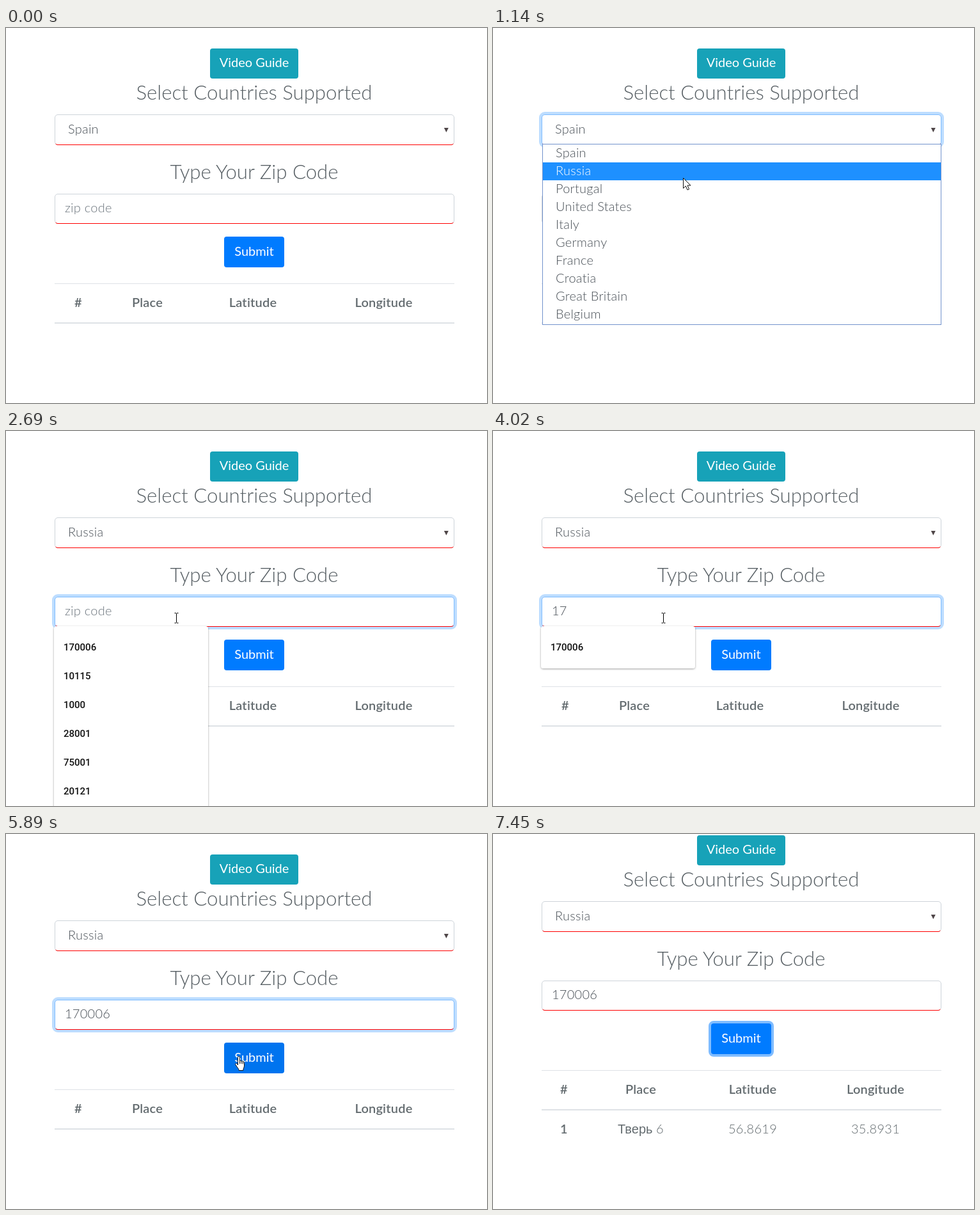
Animation, 752 px wide and 586 px high, one loop 8.09 s. Source, as an HTML page:

```html
<!DOCTYPE html>
<html lang="en">
<head>
<meta charset="utf-8">
<title>Zip code lookup</title>
<style>
  html, body { margin: 0; width: 100%; height: 100%; overflow: hidden; background: #fff; }
  svg { display: block; width: 752px; height: 586px; }
  text { font: 300 20px Lato, "Open Sans", sans-serif; letter-spacing: .25px; fill: #495057; white-space: pre; }
  .mid { text-anchor: middle; }
  .head { font-size: 31.2px; letter-spacing: 0; fill: #555d62; }
  .bold { font-weight: 600; letter-spacing: .2px; fill: #636b6f; }
  .cell { fill: #636b6f; }
  .white { fill: #fff; }
  .label { font-weight: 400; letter-spacing: 0; fill: #fff; }
  .cyr { font-family: "Liberation Sans", Arial, sans-serif; font-weight: 400; letter-spacing: 0; }
  .hint { font: 500 15px Roboto, sans-serif; letter-spacing: 0; fill: #111; }
  .red { fill: none; stroke: #f00; }
</style>
</head>
<body>
<svg id="stage" viewBox="0 0 752 586" xmlns="http://www.w3.org/2000/svg">
  <defs>
    <filter id="shade" x="-10%" y="-10%" width="120%" height="130%">
      <feDropShadow dx="0" dy="1" stdDeviation="1.6" flood-color="#000" flood-opacity=".38"/>
    </filter>
  </defs>
  <g id="page">
    <rect x="319" y="32" width="138" height="47" rx="4" fill="#17a2b8"/>
    <text class="mid label" x="388" y="61">Video Guide</text>
    <text class="mid head" x="388" y="112">Select Countries Supported</text>
    <g id="select"></g>
    <text id="country" x="97" y="165"></text>
    <path d="M684.8 156h7l-3.5 7z" fill="#4f4648"/>
    <text class="mid head" x="388" y="236">Type Your Zip Code</text>
    <g id="input"></g>
    <text id="zip" x="92" y="288"></text>
    <rect id="caret" y="269" width="1" height="27" fill="#222"/>
    <rect id="ring" x="341" y="326" width="94" height="48" rx="4" fill="none" stroke="#007bff"/>
    <rect id="button" x="341" y="326" width="94" height="48" rx="4"/>
    <text class="mid label" x="388" y="356">Submit</text>
    <path d="M76 399.5h625" stroke="#dee2e6"/>
    <path d="M76 461h625" stroke="#dee2e6" stroke-width="2"/>
    <g id="table"></g>
    <g id="hints"></g>
    <g id="menu"></g>
  </g>
  <g id="cursor" stroke-linejoin="round">
    <path id="arrow" d="M.5.5V16.5L4.3 13 7 19 9.6 17.9 7 12H12Z" fill="#fff" stroke="#111"/>
    <path id="beam" d="M.5.5H3M4 .5H6.5M3.5 1V15.5M.5 16H3M4 16H6.5" fill="none" stroke="#000"/>
    <path id="hand" d="M4.5 14V2C4.5 0 7.5 0 7.5 2V8C7.5 6.4 10 6.6 10 8.4 10.4 7.1 12.4 7.5 12.4 9.2 13 8.4 14.5 8.9 14.5 10.4V15C14.5 18 12.8 19 12.8 22.5H6.2C6 19.5 3.2 17.6 .9 13.4 0 11.6 2.3 10.6 3.3 12.2Z M7.5 8V12M10 8.4V12M12.4 9.2V12.4" fill="#fff" stroke="#111"/>
  </g>
</svg>
<script>
const LOOP = 8090;
const COUNTRIES = ["Spain", "Russia", "Portugal", "United States", "Italy",
  "Germany", "France", "Croatia", "Great Britain", "Belgium"];
const ZIPS = ["170006", "10115", "1000", "28001", "75001", "20121", "4000"];
const HEADS = ["#", "Place", "Latitude", "Longitude"];

// Cursor moves: start, end, steps, from x, y, to x, y, shape
const MOVES = [
  [70, 180, 3, 510, 402, 391, 173, "arrow"],
  [960, 1140, 3, 372, 188, 297, 234, "arrow"],
  [1760, 2000, 4, 290, 245, 265, 285, "beam"],
  [2540, 2540, 1, 263, 284, 263, 284, "beam"],
  [5730, 5810, 2, 285, 296, 318, 318, "arrow"],
  [5890, 6050, 3, 358, 347, 363, 352, "hand"],
  [6510, 6510, 1, 363, 322, 363, 322, "hand"],
  [6900, 6900, 1, 385, 328, 385, 328, "hand"],
  [6980, 7370, 6, 422, 368, 607, 567, "arrow"]
];
const KEYS = [3150, 3470, 4100, 4400, 4800, 5180];
const CARET = [[2160, 2690], [3150, 4020], [4100, 5730]];

const $ = id => document.getElementById(id);
const lerp = (a, b, k) => a + (b - a) * k;
const within = (t, a, b) => t >= a && t < b;
const ramp = (t, start, ms = 150) => {
  const k = Math.min(1, Math.max(0, (t - start) / ms));
  return k * k * (3 - 2 * k);
};
const pulse = (t, on, off) => ramp(t, on) - ramp(t, off);
const mix = (a, b, k) => `rgb(${a.map((v, i) => Math.round(lerp(v, b[i], k)))})`;
const show = (el, on) => el.setAttribute("visibility", on ? "visible" : "hidden");

function add(parent, tag, attrs, label) {
  const el = document.createElementNS("http://www.w3.org/2000/svg", tag);
  for (const name in attrs) el.setAttribute(name, attrs[name]);
  if (label) el.textContent = label;
  parent.appendChild(el);
  return el;
}

function field(id, y, h) {
  const g = $(id), b = y + h;
  const glow = add(g, "rect", { x: 76, y, width: 625, height: h, rx: 5, fill: "none", stroke: "#007bff" });
  const box = add(g, "rect", { x: 76.5, y: y + .5, width: 624, height: h - 1, rx: 4.5, fill: "#fff" });
  add(g, "path", { class: "red", d: `M77.6 ${b - 2}Q78.8 ${b - .5} 81 ${b - .5}H696Q698.2 ${b - .5} 699.4 ${b - 2}` });
  return k => {
    glow.setAttribute("stroke-width", 8 * k);
    glow.setAttribute("stroke-opacity", .26 * k);
    box.setAttribute("stroke", mix([206, 212, 218], [128, 189, 255], k));
  };
}
const focusSelect = field("select", 135, 48);
const focusInput = field("input", 259, 47);

add($("menu"), "rect", { x: 77.5, y: 181.5, width: 623, height: 282, fill: "#fff", stroke: "#7393cc" });
const mark = add($("menu"), "rect", { x: 78, width: 622, height: 28, fill: "#1e90ff" });
const options = COUNTRIES.map((name, i) => add($("menu"), "text", { x: 98, y: 202 + 28 * i }, name));

const sheet = add($("hints"), "rect", { x: 75, y: 305, width: 241, rx: 4, fill: "#fff", filter: "url(#shade)" });
const hints = ZIPS.map((zip, i) => add($("hints"), "text", { class: "hint", x: 90, y: 343 + 45 * i }, zip));

const heads = HEADS.map(name => add($("table"), "text", { class: "mid bold", y: 436 }, name));
const row = add($("table"), "g", {});
const COLS = [[113, 221, 386, 590.5], [111, 231, 406, 598]];
["1", "", "56.8619", "35.8931"].forEach((value, i) => {
  const cell = add(row, "text", { class: i ? "mid cell" : "mid bold", x: COLS[1][i], y: 498 }, value);
  if (i === 1) {
    add(cell, "tspan", { class: "cyr" }, "Тверь");
    add(cell, "tspan", {}, " 6");
  }
});

function drawCursor(t) {
  const move = MOVES.filter(m => t >= m[0]).pop();
  show($("cursor"), move && t < 7450);
  if (!move) return 0;
  const [start, end, steps, x0, y0, x1, y1, shape] = move;
  const gap = (end - start) / (steps - 1);
  const k = steps < 2 ? 1 : Math.min(1, Math.floor((t - start) / gap + .001) / (steps - 1));
  const x = Math.round(lerp(x0, x1, k)), y = Math.round(lerp(y0, y1, k));
  $("cursor").setAttribute("transform", `translate(${x} ${y})`);
  for (const id of ["arrow", "beam", "hand"]) $(id).setAttribute("display", id === shape ? "inline" : "none");
  return y;
}

function draw(t) {
  const tip = drawCursor(t);
  const done = t >= 6510;
  $("page").setAttribute("transform", `translate(0 ${done ? -30 : 0})`);

  // Country list
  focusSelect(pulse(t, 725, 2150));
  $("country").textContent = COUNTRIES[t < 1520 ? 0 : 1];
  const open = t < 1520 ? lerp(.35, 1, ramp(t, 730, 75)) : .4;
  show($("menu"), within(t, 730, 1600));
  $("menu").setAttribute("opacity", open);
  const pick = t > 900 && tip >= 210 ? 1 : 0;
  mark.setAttribute("y", 182 + 28 * pick);
  options.forEach((el, i) => el.setAttribute("class", i === pick ? "white" : ""));

  // Zip code and its suggestions
  const typed = KEYS.filter(key => t >= key).length;
  focusInput(pulse(t, 2150, 6180));
  $("zip").textContent = typed ? "170006".slice(0, typed) : "zip code";
  $("zip").style.fill = typed ? "#495057" : "#6c757d";
  $("caret").setAttribute("x", Math.round(92 + 11.9 * typed));
  show($("caret"), CARET.some(([on, off]) => within(t, on, off)));
  const count = typed ? (typed > 1 ? 1 : 3) : ZIPS.length;
  show($("hints"), within(t, 2230, 5180));
  sheet.setAttribute("height", 21 + 45 * count);
  hints.forEach((el, i) => el.setAttribute("display", i < count ? "inline" : "none"));

  // Button
  const hover = pulse(t, 5825, 6980), press = pulse(t, 6190, 6350), ring = ramp(t, 6185);
  $("button").setAttribute("fill", mix([0, 123, 255], [0, 105 - 7 * press, 217 - 13 * press], hover));
  $("ring").setAttribute("stroke-width", 8 * ring);
  $("ring").setAttribute("stroke-opacity", .5 * ring);

  // Results
  heads.forEach((el, i) => el.setAttribute("x", COLS[done ? 1 : 0][i]));
  show(row, done);
}

const begin = performance.now();
function tick() {
  draw((performance.now() - begin) % LOOP);
  requestAnimationFrame(tick);
}
tick();
</script>
</body>
</html>
```
